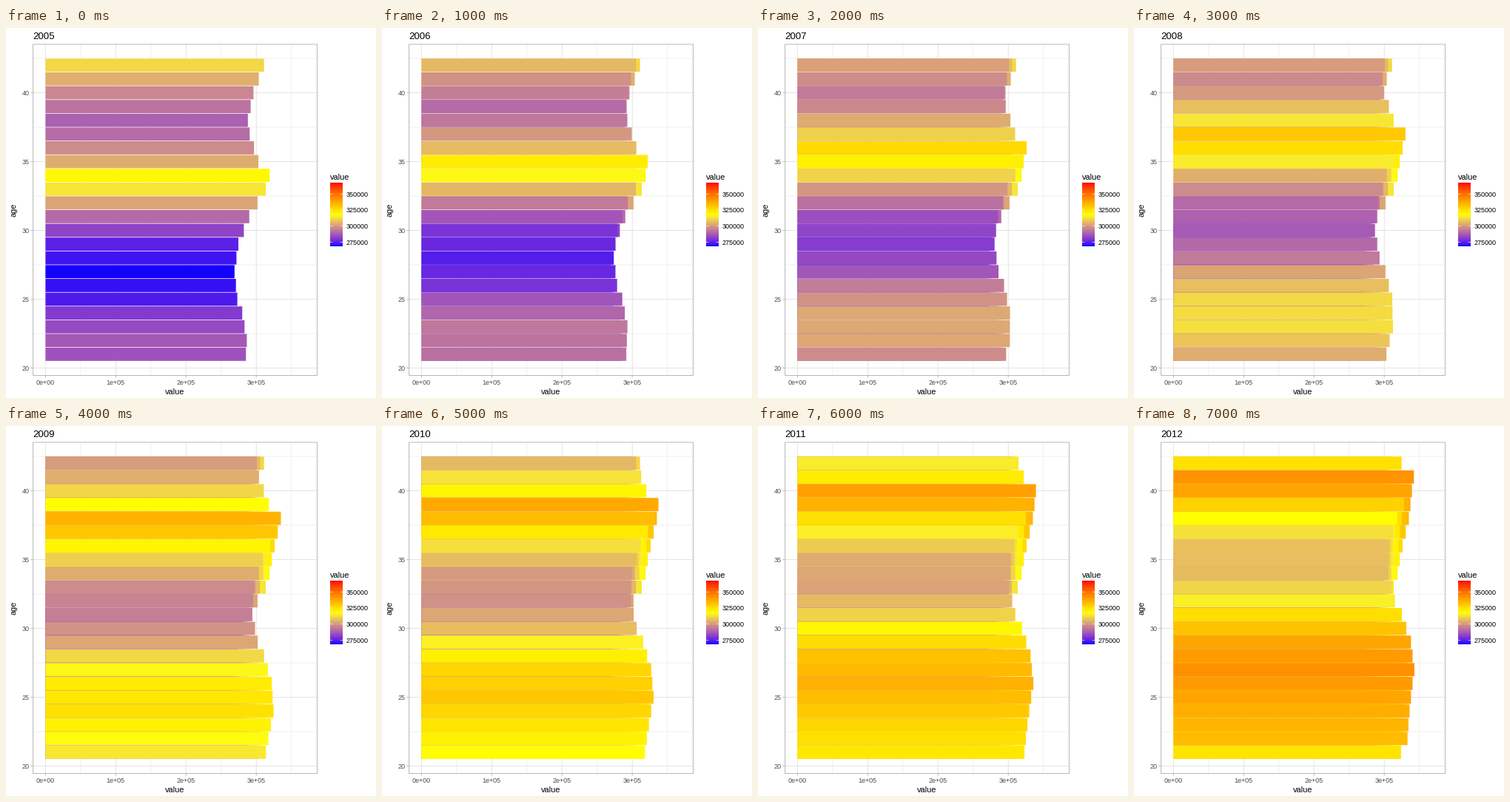
Recreate the animation shown at these times as a matplotlib script. Size 500 by 500 pixels, loop 8000 ms.

```python
import numpy as np
import matplotlib.pyplot as plt
from matplotlib.animation import FuncAnimation
from matplotlib.patches import Rectangle

plt.rcParams["font.family"] = "Liberation Sans"
plt.rcParams["path.snap"] = False
PX = 0.72  # points per pixel at 100 dpi

START, STEPS = 2005, 8
AGES = np.arange(21, 43)
LOW, HIGH = 268.5, 367.0

# Cohort sizes in thousands, as (age in the first year, size)
COHORTS = [(14, 236), (15, 251), (20, 284), (22, 286.5), (24, 280), (25, 273),
           (27, 269), (29, 274.5), (31, 290), (33, 313.5), (34, 319),
           (35, 303), (37, 290.5), (38, 288), (40, 296), (42, 311)]
# Yearly gain of a 21-year-old cohort; older cohorts gain less
GAINS = [7, 10.75, 10.75, 14, 7, 7, 10]


def population(n):
    """Cohort sizes n years on: each moves up one age a year and grows."""
    first_age = AGES - n
    size = np.interp(first_age, *zip(*COHORTS))
    for k, gain in enumerate(GAINS[:n]):
        size = size + gain * np.exp(-(first_age + k - 21) / 15)
    return size


# Colour scale: blue, yellow, red blended in CIE Lab
TO_XYZ = np.array([[0.4124, 0.3576, 0.1805],
                   [0.2126, 0.7152, 0.0722],
                   [0.0193, 0.1192, 0.9505]])
WHITE = TO_XYZ.sum(axis=1)
TO_LAB = np.array([[0, 116, 0], [500, -500, 0], [0, 200, -200]])
OFFSET = np.array([-16, 0, 0])
DISPLAY_GAMMA = 2.2 / 1.8


def rgb_to_lab(rgb):
    # Only pure channels are used, so no gamma step is needed
    t = TO_XYZ @ np.array(rgb, float) / WHITE
    f = np.where(t > 0.008856, np.cbrt(t), 7.787 * t + 16 / 116)
    return TO_LAB @ f + OFFSET


def lab_to_rgb(lab):
    f = np.linalg.solve(TO_LAB, lab - OFFSET)
    xyz = np.where(f > 0.2069, f ** 3, (f - 16 / 116) / 7.787) * WHITE
    lin = np.clip(np.linalg.solve(TO_XYZ, xyz), 0, 1)
    rgb = np.where(lin > 0.0031308, 1.055 * lin ** (1 / 2.4) - 0.055, 12.92 * lin)
    return np.clip(rgb, 0, 1) ** DISPLAY_GAMMA


STOPS = np.array([rgb_to_lab(c) for c in [(0, 0, 1), (1, 1, 0), (1, 0, 0)]])


def fill(value):
    t = (value - LOW) / (HIGH - LOW)
    return lab_to_rgb(np.array([np.interp(t, [0, 0.5, 1], s) for s in STOPS.T]))


def x_of(value):
    return 53.4 + 0.9495 * value


def y_of(age):
    return 459.5 - 18.6 * (age - 20)


def legend_y(value):
    return 267.6 - 0.868 * (value - 300)


fig = plt.figure(figsize=(5, 5), dpi=100, facecolor="white")
ax = fig.add_axes([0, 0, 1, 1])
ax.axis("off")
LEFT, RIGHT, TOP, BOTTOM = 36.5, 420.5, 22, 469.5


def line(x0, y0, x1, y1, color, width, z=1):
    ax.plot([x0, x1], [y0, y1], color=color, lw=width * PX, zorder=z,
            solid_capstyle="butt")


def label(x, y, text, size, color="black", **kw):
    return ax.text(x, y, text, fontsize=size * PX, color=color,
                   **{"va": "baseline", **kw})


# Grid, ticks and axis labels
MINOR, GRID, EDGE, GREY = "#ededed", "#e4e4e4", "#b8b8b8", "#4d4d4d"
for v in range(50, 351, 100):
    line(x_of(v), TOP, x_of(v), BOTTOM, MINOR, 0.8)
for a in np.arange(22.5, 43, 5):
    line(LEFT, y_of(a), RIGHT, y_of(a), MINOR, 0.8)
for v in range(0, 301, 100):
    line(x_of(v), TOP, x_of(v), BOTTOM, GRID, 1)
    line(x_of(v), BOTTOM, x_of(v), BOTTOM + 3, EDGE, 1)
    label(x_of(v), 482, f"{v * 1000:.0e}", 9, GREY, ha="center")
for a in range(20, 41, 5):
    line(LEFT, y_of(a), RIGHT, y_of(a), GRID, 1)
    line(LEFT - 3, y_of(a), LEFT, y_of(a), EDGE, 1)
    label(31.5, y_of(a) + 3.4, str(a), 9, GREY, ha="right")
label(228.5, 495, "value", 11, ha="center")
label(10.5, 245.5, "age", 11, ha="center", va="center", rotation=90)
title = label(36, 15, "", 13.2)

# Colour legend
label(437.5, 205, "value", 11)
ramp = np.array([[fill(v)] for v in np.linspace(HIGH, LOW, 86)])
ax.imshow(ramp, extent=(438, 455, 295, 209), aspect="auto", zorder=2)
for v in range(275, 351, 25):
    y = legend_y(v)
    line(438, y, 441.4, y, "white", 0.6, 3)
    line(451.6, y, 455, y, "white", 0.6, 3)
    label(459.3, y + 3.3, f"{v}000", 9)

# Each year's bars stay beneath those of later years
layers = []
for n in range(STEPS):
    values = population(n)
    layers.append(ax.barh(y_of(AGES), x_of(values) - x_of(0),
                          height=0.96 * 18.6, left=x_of(0),
                          color=[fill(v) for v in values],
                          linewidth=0, zorder=4 + n))

ax.add_patch(Rectangle((LEFT, TOP), RIGHT - LEFT, BOTTOM - TOP, fill=False,
                       ec=EDGE, lw=PX, zorder=20))
ax.set_xlim(0, 500)
ax.set_ylim(500, 0)


def draw(i):
    title.set_text(str(START + i))
    for n, bars in enumerate(layers):
        for bar in bars:
            bar.set_visible(n <= i)
    return []


anim = FuncAnimation(fig, draw, frames=STEPS, interval=1000,
                     init_func=lambda: draw(0), repeat=True, repeat_delay=0)
plt.show()
```
